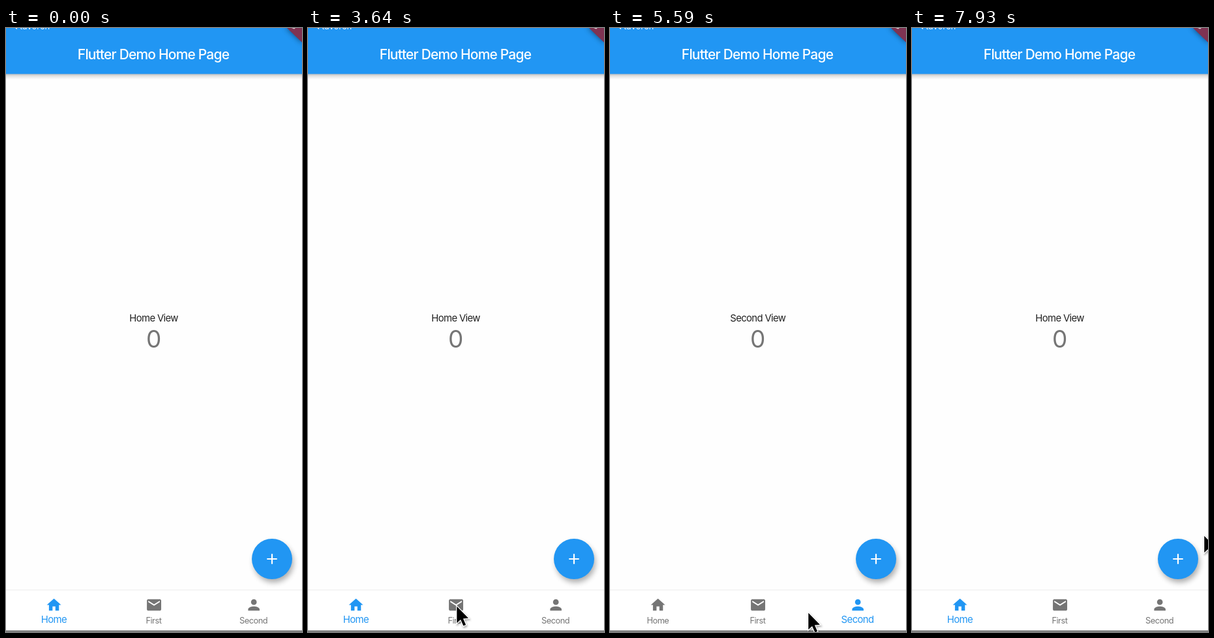
Write an HTML page that moves like this. It is 454x926 px and loops after 8 s.

```html
<!DOCTYPE html>
<html lang="en">
<head>
<meta charset="utf-8">
<title>Bottom navigation demo</title>
<style>
html, body { margin: 0; width: 100%; height: 100%; overflow: hidden; background: #fefefe; }
svg { display: block; width: 454px; height: 926px; font-family: Inter, Roboto, sans-serif; }
text { text-anchor: middle; }
.start { text-anchor: start; }
.title { font-size: 21px; font-weight: 500; letter-spacing: -.82px; fill: #fff; }
.body { font-size: 14.9px; letter-spacing: -.65px; fill: #212121; }
.count { font-size: 37px; fill: #757575; }

/* Views and tabs switch hard at 3770, 5200, 6110 and 7020 ms */
.home, .first, .second, .counter, .tab { animation: 8s step-end infinite; }
.home { animation-name: home; }
.first { animation-name: first; }
.second { animation-name: second; }
.counter { animation-name: counter; }
@keyframes home { 0%, 87.75% { visibility: visible } 47.125% { visibility: hidden } }
@keyframes first { 0%, 65%, 87.75% { visibility: hidden } 47.125%, 76.375% { visibility: visible } }
@keyframes second { 0%, 76.375% { visibility: hidden } 65% { visibility: visible } }
@keyframes counter { 0%, 65%, 87.75% { visibility: visible } 47.125%, 76.375% { visibility: hidden } }

.tab { fill: #757575; font-size: 12.8px; letter-spacing: -.5px; }
/* Larger labels sit a little higher */
.tab text { transform: translateY(calc(4.5px - .35em)); }
.tab-home { animation-name: tab-home; }
.tab-first { animation-name: tab-first; }
.tab-second { animation-name: tab-second; }
@keyframes tab-home {
  0%, 87.75% { fill: #2196f3; font-size: 14.9px; letter-spacing: -.6px }
  47.125% { fill: #757575; font-size: 12.8px; letter-spacing: -.5px }
}
@keyframes tab-first {
  0%, 65%, 87.75% { fill: #757575; font-size: 12.8px; letter-spacing: -.5px }
  47.125%, 76.375% { fill: #2196f3; font-size: 14.9px; letter-spacing: -.6px }
}
@keyframes tab-second {
  0%, 76.375% { fill: #757575; font-size: 12.8px; letter-spacing: -.5px }
  65% { fill: #2196f3; font-size: 14.9px; letter-spacing: -.6px }
}

/* The pointer advances once every 130 ms (1.625 %) */
.pointer { animation: pointer 8s infinite; filter: drop-shadow(1px 2px 1.5px rgba(0, 0, 0, .35)); }
@keyframes pointer {
  0% { transform: translate(172px, 932px); animation-timing-function: step-end }
  11.375% { transform: translate(172px, 932px); animation-timing-function: steps(6) }
  21.125% { transform: translate(197px, 877px); animation-timing-function: steps(1) }
  22.75% { transform: translate(198px, 878px); animation-timing-function: steps(5) }
  30.875% { transform: translate(227px, 884px); animation-timing-function: step-end }
  48.75% { transform: translate(227px, 884px); animation-timing-function: steps(5) }
  56.875% { transform: translate(276px, 884px); animation-timing-function: steps(2) }
  60.125% { transform: translate(363px, 885px); animation-timing-function: step-end }
  61.75% { transform: translate(364px, 886px); animation-timing-function: step-end }
  63.375% { transform: translate(364px, 886px); animation-timing-function: steps(4) }
  69.875% { transform: translate(303px, 894px); animation-timing-function: steps(2) }
  73.125% { transform: translate(230px, 889px); animation-timing-function: step-end }
  74.75% { transform: translate(230px, 889px); animation-timing-function: steps(4) }
  81.25% { transform: translate(113px, 891px); animation-timing-function: steps(2) }
  84.5% { transform: translate(77px, 886px); animation-timing-function: step-end }
  86.125% { transform: translate(77px, 886px); animation-timing-function: steps(7) }
  97.5% { transform: translate(403px, 798px); animation-timing-function: step-end }
  99.125%, 100% { transform: translate(447px, 776px); animation-timing-function: step-end }
}
</style>
</head>
<body>
<svg viewBox="0 0 454 926">
  <defs>
    <linearGradient id="shade" x2="0" y2="1">
      <stop offset="0" stop-opacity=".26"/>
      <stop offset=".45" stop-opacity=".1"/>
      <stop offset="1" stop-opacity="0"/>
    </linearGradient>
    <filter id="soft" x="-30%" y="-30%" width="160%" height="160%">
      <feGaussianBlur stdDeviation="4"/>
    </filter>
  </defs>

  <rect width="454" height="926" fill="#fefefe"/>

  <!-- Views -->
  <text class="body home" x="226.6" y="449.5">Home View</text>
  <text class="body second" x="226.8" y="449.5">Second View</text>
  <text class="body first start" x="-3.6" y="85.5">First</text>
  <g class="counter">
    <text class="count" x="226.6" y="489.5">0</text>
    <circle cx="410.5" cy="819.5" r="30.5" opacity=".32" filter="url(#soft)"/>
    <circle cx="408" cy="814" r="31" fill="#2196f3"/>
    <path d="M400.3 814h15.4M408 806.3v15.4" stroke="#fff" stroke-width="2.2"/>
  </g>

  <!-- App bar -->
  <rect y="70" width="454" height="9" fill="url(#shade)"/>
  <rect width="454" height="70.5" fill="#2196f3"/>
  <text class="title" x="226" y="48">Flutter Demo Home Page</text>
  <g fill="#fff">
    <path d="M11 -2l6-4v8z"/>
    <text class="start" x="21" y="2" font-size="13">tavoren</text>
  </g>
  <path d="M428 -2l28 26V-2z" opacity=".5" filter="url(#soft)"/>
  <path d="M431 0h23v22z" fill="#7f3352"/>
  <path d="M438 0h6l-2 1.6z" fill="#fff" opacity=".8"/>

  <!-- Bottom bar -->
  <rect y="862" width="454" height="62" fill="#fff"/>
  <rect y="861" width="454" height="1.2" fill="#efefef"/>
  <rect y="923.8" width="454" height="1.7" fill="#4a4a4a"/>
  <g class="tab tab-home">
    <path transform="translate(60.4 871.4) scale(1.097)" d="M10 20v-6h4v6h5v-8h3L12 3 2 12h3v8z"/>
    <text x="73.4" y="912.7">Home</text>
  </g>
  <g class="tab tab-first">
    <path transform="translate(213.9 871.4) scale(1.097)" d="M20 4H4c-1.1 0-1.99.9-1.99 2L2 18c0 1.1.9 2 2 2h16c1.1 0 2-.9 2-2V6c0-1.1-.9-2-2-2zm0 4l-8 5-8-5V6l8 5 8-5v2z"/>
    <text x="226.4" y="912.7">First</text>
  </g>
  <g class="tab tab-second">
    <path transform="translate(367 871.4) scale(1.097)" d="M12 12c2.21 0 4-1.79 4-4s-1.79-4-4-4-4 1.79-4 4 1.79 4 4 4zm0 2c-2.67 0-8 1.34-8 4v2h16v-2c0-2.66-5.33-4-8-4z"/>
    <text x="379.6" y="912.7">Second</text>
  </g>

  <g class="pointer">
    <path transform="translate(1.3 2.8) scale(.96)" d="M0 0V26.4L6 21l4.5 10 3.9-1.7L10 19.5l8.4-.7z" stroke="#fff" stroke-width="2.6" paint-order="stroke"/>
  </g>
</svg>
</body>
</html>
```
